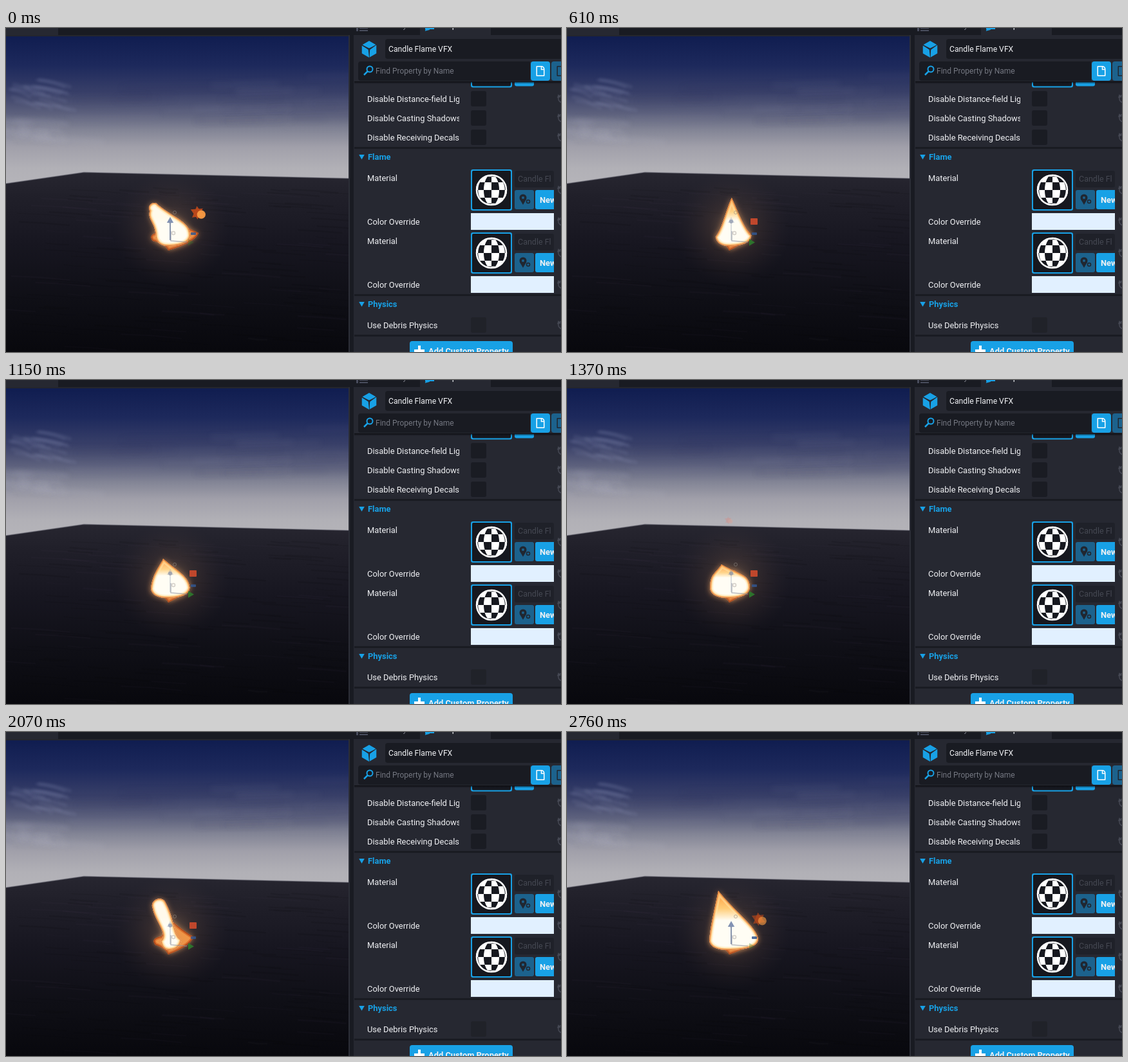
Write an HTML page with a canvas that moves like this. It is 862 px wide and 504 px high and loops after 2.83 s.

```html
<!DOCTYPE html>
<html lang="en">
<head>
<meta charset="utf-8">
<title>Candle flame editor</title>
<style>
html, body { margin: 0; width: 100%; height: 100%; overflow: hidden; background: #191b21; }
canvas { display: block; }
</style>
</head>
<body>
<canvas id="stage" width="862" height="504"></canvas>
<script>
const W = 862, H = 504, LOOP = 2830, STEP = 76.6, STEPS = 37;
const BLUE = '#18a1e6', DIM_BLUE = '#1c628d', PANEL = '#262831', DARK = '#191b22', INK = '#202630';
const stage = document.getElementById('stage').getContext('2d');
const still = document.createElement('canvas');
still.width = W;
still.height = H;
let g = still.getContext('2d');

const mix = (a, b, u) => a + (b - a) * u;
const clamp = u => Math.min(1, Math.max(0, u));

function seeded(n) {
  return () => {
    n = (n * 16807) % 2147483647;
    return n / 2147483647;
  };
}

function box(x, y, w, h, color, r = 0) {
  g.fillStyle = color;
  g.beginPath();
  g.roundRect(x, y, w, h, r);
  g.fill();
}

function poly(points, color) {
  g.fillStyle = color;
  g.beginPath();
  points.forEach(([x, y]) => g.lineTo(x, y));
  g.closePath();
  g.fill();
}

function triangle(x, y, r, angle, color) {
  poly([0, 1, 2].map(k => {
    const a = angle + k * Math.PI * 2 / 3;
    return [x + r * Math.cos(a), y + r * Math.sin(a)];
  }), color);
}

function line(points, color, width) {
  g.strokeStyle = color;
  g.lineWidth = width;
  g.beginPath();
  points.forEach(([x, y]) => g.lineTo(x, y));
  g.stroke();
}

function disc(x, y, r, color) {
  g.fillStyle = color;
  g.beginPath();
  g.arc(x, y, r, 0, 7);
  g.fill();
}

function ring(x, y, r, color, width, from = 0, to = 7) {
  g.strokeStyle = color;
  g.lineWidth = width;
  g.beginPath();
  g.arc(x, y, r, from, to);
  g.stroke();
}

function text(str, x, y, { color = '#f0f1f4', size = 12.9, weight = 400, right = W } = {}) {
  g.save();
  g.beginPath();
  g.rect(0, 0, right, H);
  g.clip();
  g.font = `${weight} ${size}px Roboto, sans-serif`;
  g.fillStyle = color;
  g.fillText(str, x, y);
  g.restore();
}

function shade(fade, stops) {
  stops.forEach(([at, color]) => fade.addColorStop(at, color));
  return fade;
}

const ramp = (y0, y1, stops) => shade(g.createLinearGradient(0, y0, 0, y1), stops);
const halo = (x, y, r, stops) => disc(x, y, r, shade(g.createRadialGradient(x, y, 0, x, y, r), stops));

// Scene behind the flame

function wisps(count, seed, area, size, color, blur) {
  const rnd = seeded(seed), [x, y, w, h] = area, [length, drop, width] = size;
  g.lineCap = 'round';
  g.filter = `blur(${blur}px)`;
  g.strokeStyle = color;
  for (let i = 0; i < count; i++) {
    const x0 = x + rnd() * w, y0 = y + rnd() * h, reach = length * (.5 + rnd());
    g.lineWidth = width * (.5 + rnd());
    g.beginPath();
    g.moveTo(x0, y0);
    g.quadraticCurveTo(x0 + reach / 2, y0 + drop * .2, x0 + reach, y0 + drop);
    g.stroke();
  }
  g.filter = 'none';
  g.lineCap = 'butt';
}

function drawSky() {
  box(0, 13, 532, 232, ramp(13, 240, [
    [0, '#101d50'], [.2, '#1d295c'], [.38, '#383f68'], [.53, '#5d617d'],
    [.64, '#828495'], [.76, '#a1a0aa'], [.9, '#b1b0b6'], [1, '#b5b4b9']
  ]));
  wisps(18, 41, [5, 80, 50, 38], [42, 11, 3], 'rgba(170,176,208,.14)', 2);
  wisps(14, 53, [-30, 140, 90, 34], [75, 6, 6], 'rgba(198,198,208,.12)', 4);
  wisps(12, 67, [100, 75, 380, 80], [120, -3, 6], 'rgba(150,155,185,.07)', 5);
  wisps(12, 71, [80, 80, 400, 85], [120, -3, 6], 'rgba(40,45,80,.06)', 5);
}

function drawGround() {
  const horizon = [[0, 242], [121, 224.5], [532, 234]];
  poly([...horizon, [532, 504], [0, 504]],
    ramp(224, 504, [[0, '#272630'], [.15, '#201f29'], [.4, '#171620'], [.7, '#0f0f16'], [1, '#08080d']]));
  line(horizon, 'rgba(100,100,112,.5)', 1.5);
  const rnd = seeded(97);
  for (let i = 0; i < 150; i++) {
    const x = rnd() * 500, y = 248 + rnd() * 250, w = 25 + rnd() * 70;
    line([[x, y], [x + w * .5, y + 2], [x + w, y + w * .07]],
      i % 3 ? 'rgba(0,0,5,.1)' : 'rgba(70,65,85,.07)', 1 + rnd() * 2);
  }
}

function drawScene() {
  g.save();
  g.beginPath();
  g.rect(0, 13, 532, 491);
  g.clip();
  drawSky();
  drawGround();
  g.restore();
  box(0, 0, 540, 12, DARK);
  box(0, 0, 81, 11, PANEL);
  box(0, 11, 533, 2, '#24262e');
  box(532, 11, 2, 493, '#2c2e37');
  box(534, 11, 6, 493, DARK);
}

// Property panel

function drawCube(x, y, r) {
  const corner = (k, size) => {
    const a = Math.PI * (k / 3 - .5);
    return [x + size * Math.cos(a), y + size * Math.sin(a)];
  };
  for (let k = 0; k < 6; k += 2) {
    poly([corner(k, 1.5), corner(k - 1, r), corner(k, r), corner(k + 1, r)], BLUE);
    line([[x, y], corner(k + 1, r + 1)], PANEL, 1.5);
  }
}

function drawPage(x, y, color, fill) {
  box(x - 6.5, y - 8, 13, 16, color, [1, 5, 1, 1]);
  box(x - 5, y - 6.5, 10, 13, fill, [0, 4, 0, 0]);
  line([[x + 1.5, y - 7], [x + 1.5, y - 2.5], [x + 6, y - 2.5]], color, 1.5);
}

function drawGlobe(x, y, r) {
  const n = 6, arc = 8, edge = k => (k / n - .5) * Math.PI;
  disc(x, y, r, '#16181f');
  for (let row = 0; row < n; row++) {
    for (let col = row % 2; col < n; col += 2) {
      const cell = [];
      for (let s = 0; s <= arc * 2 + 1; s++) {
        const back = s > arc;
        const lat = edge(row + (back ? arc * 2 + 1 - s : s) / arc);
        const lon = edge(col + back);
        cell.push([x + r * Math.sin(lon) * Math.cos(lat), y + r * Math.sin(lat)]);
      }
      poly(cell, '#fff');
    }
  }
  ring(x, y, r - 1, '#fff', 2.5);
}

function drawReset(y) {
  ring(864, y, 6, '#464954', 1.5, 1.9, 4.3);
  triangle(858.5, y - 3.5, 3.5, 2.4, '#464954');
}

function drawPin(x, y) {
  disc(x, y, 5.5, INK);
  triangle(x, y + 5, 6, Math.PI / 2, INK);
  disc(x, y, 2, DIM_BLUE);
  ring(x + 8, y + 6, 2.5, INK, 1.5);
}

function drawMaterial(y) {
  text('Material', 561, y + 18);
  box(722, y, 64, 64, BLUE, 3);
  box(724, y + 2, 60, 60, '#16181f', 2);
  drawGlobe(754, y + 32, 24);
  box(790, y + 2, 61, 26, '#1f2129', 3);
  text('Candle Fl', 795, y + 19, { color: '#454852', size: 12.5, right: 849 });
  box(790, y + 32, 30, 30, DIM_BLUE, 3);
  drawPin(803, y + 44);
  box(822, y + 32, 29, 30, BLUE, [3, 0, 0, 3]);
  text('New', 829, y + 52, { weight: 700, right: 851 });
  text('Color Override', 561, y + 86);
  box(722, y + 68, 129, 26, '#e1f0ff');
  drawReset(y + 32);
  drawReset(y + 81);
}

function drawSection(name, y) {
  box(541, y - 16, 321, 3, DARK);
  triangle(552.5, y - 1.5, 5, Math.PI / 2, BLUE);
  text(name, 562, y + 4, { color: BLUE, weight: 700 });
}

function drawToggle(name, y, fill = '#1a1c23') {
  text(name, 561, y + 5, { right: 704 });
  box(722, y - 12, 24, 24, fill, 3);
  drawReset(y);
}

function drawTabs() {
  box(540, 0, 322, 11, DARK);
  box(540, 11, 322, 493, PANEL);
  box(643, 0, 110, 12, PANEL);
  box(544, 0, 3, 5, '#484c5c');
  box(549, 0, 13, 1, '#484c5c');
  box(549, 3, 13, 2, '#484c5c');
  text('Hierarchy', 568, 0, { color: '#777a84' });
  text('Properties', 673, 0);
  box(651, 0, 14, 2, BLUE);
  triangle(654, 1.5, 4.5, Math.PI * .75, BLUE);
}

function drawSearch() {
  box(722, 62, 64, 30.5, BLUE, 3);
  box(724, 62, 60, 28.5, '#16181f', 2);
  box(790, 62, 30, 28.5, BLUE, 3);
  box(540, 48, 322, 36, PANEL);
  box(541, 83, 321, 4, ramp(83, 87, [[0, 'rgba(10,11,15,.9)'], [1, 'rgba(10,11,15,0)']]));
  box(589, 17, 273, 31, DARK, [4, 0, 0, 4]);
  text('Candle Flame VFX', 594, 37, { size: 12.2 });
  box(547, 52, 267, 30, DARK, [4, 0, 0, 4]);
  ring(565, 64, 4.5, BLUE, 2);
  line([[561.5, 67.5], [556, 73]], BLUE, 2.5);
  text('Find Property by Name', 574, 71, { color: '#747781', size: 12 });
  box(815, 52, 30, 30, BLUE, 4);
  drawPage(830, 67, '#fff', BLUE);
  box(847, 52, 15, 30, DIM_BLUE, [4, 0, 0, 4]);
  drawPage(862, 67, INK, DIM_BLUE);
}

function drawPanel() {
  drawTabs();
  drawSearch();
  drawCube(564, 33, 13);
  ['Disable Distance-field Lighting', 'Disable Casting Shadows', 'Disable Receiving Decals']
    .forEach((name, k) => drawToggle(name, 110 + k * 30));
  drawSection('Flame', 201);
  drawMaterial(220);
  drawMaterial(318);
  drawSection('Physics', 430);
  drawToggle('Use Debris Physics', 462, '#202229');
  box(541, 477, 321, 3, DARK);
  box(627, 487, 160, 30, BLUE, 4);
  box(634, 500, 16, 4, '#fff');
  box(640, 494, 4, 16, '#fff');
  text('Add Custom Property', 656, 507, { weight: 700 });
}

// Flame: a tongue leaning from a wide foot to a tip; head rounds the tip, swell fattens the sides

const poses = [
  { step: 0, tip: [230, 280], head: 8, left: 223, right: 302, swell: 1 },
  { step: 4, tip: [264, 260], head: 0, left: 233, right: 284, swell: 0 },
  { step: 11, tip: [245, 273], head: 1, left: 228, right: 290, swell: .6 },
  { step: 18, tip: [240, 288], head: 1, left: 221, right: 286, swell: 1 },
  { step: 27, tip: [238, 270], head: 11, left: 227, right: 294, swell: .2 },
  { step: 32, tip: [277, 271], head: 0, left: 222, right: 292, swell: .5 },
  { step: 36, tip: [235, 247], head: 0, left: 221, right: 297, swell: .9 }
];

function poseAt(step) {
  const last = poses.findLastIndex(p => p.step <= step);
  const a = poses[last], b = poses[(last + 1) % poses.length];
  const u = (step - a.step) / ((b.step || STEPS) - a.step), ease = u * u * (3 - 2 * u);
  const blend = key => mix(a[key], b[key], ease);
  const rnd = seeded(step * 733 + 19), sway = Math.sin(Math.PI * u) * 10;
  rnd();
  return {
    tip: a.tip.map((v, k) => mix(v, b.tip[k], ease) + (rnd() - .5) * sway),
    head: blend('head'), left: blend('left'), right: blend('right'), swell: blend('swell')
  };
}

function tongue({ tip: [x, y], head, left, right, swell }) {
  const l = left + head * 1.2, r = right - head * 2, pinch = 16 * (1 - swell), rise = 318 - 16 * swell;
  const neckX = mix(256, x, .5), neckY = mix(318, y, .5), w = 7 + swell * 12 + head * .6;
  const long = Math.hypot(x - neckX, y - neckY);
  const dx = (x - neckX) / long * head, dy = (y - neckY) / long * head;
  const path = new Path2D();
  path.moveTo(254, 339);
  path.quadraticCurveTo(l + 3, 340, l, 325);
  path.bezierCurveTo(l + pinch, rise, neckX - w, neckY, x + dy, y - dx);
  path.bezierCurveTo(x + dy + dx * 1.3, y - dx + dy * 1.3, x - dy + dx * 1.3, y + dx + dy * 1.3, x - dy, y + dx);
  path.bezierCurveTo(neckX + w, neckY, r - pinch, rise, r, 323);
  path.quadraticCurveTo(r - 2, 338, 254, 339);
  return path;
}

function skirt({ left, right }) {
  const path = new Path2D();
  path.moveTo(252, 346);
  path.quadraticCurveTo(248, 336, left + 5, 331);
  path.quadraticCurveTo(left - 3, 321, left + 14, 318);
  path.lineTo(260, 296);
  path.quadraticCurveTo(272, 307, right - 3, 319);
  path.quadraticCurveTo(right - 8, 333, 252, 346);
  return path;
}

function burn(path, fill, rims) {
  g.save();
  g.shadowColor = 'rgba(215,145,90,.7)';
  g.shadowBlur = 9;
  g.fillStyle = fill;
  g.fill(path);
  g.shadowBlur = 0;
  g.clip(path);
  rims.forEach(([width, color]) => {
    g.lineWidth = width;
    g.strokeStyle = color;
    g.stroke(path);
  });
  g.restore();
}

function drawHandles(step) {
  const seam = Math.min(step, STEPS - 1 - step), red = clamp(seam / 4);
  g.globalAlpha = .6;
  line([[256, 316], [256, 331], [281, 333]], '#8e929f', 1.5);
  ring(260, 319, 2.5, '#b9b4ae', 1.5);
  ring(262, 287, 2.5, '#8c8580', 1);
  disc(255, 301, 3, '#79829a');
  g.globalAlpha = 1 - clamp(seam / 8) * .7;
  triangle(255, 300, 6, -Math.PI / 2, '#8292b3');
  line([[255, 303], [255, 330]], '#8995ad', 2);
  g.globalAlpha = .85;
  box(287, 318, 8, 4, '#31568f', 1);
  g.globalAlpha = red * .9;
  box(285, 296, 11, 10, '#cf4a2c', 1);
  g.globalAlpha = .3 + red * .6;
  triangle(286, 333.5, 6, 0, '#2c7a2c');
  g.globalAlpha = 1;
}

// Sparks drift upwards and are brightest at their own moment
const sparks = [
  { at: 0, x: 300, y: 288, size: 11, rise: .05, outer: '#b9481b', inner: '#f99b43' },
  { at: 1370, x: 252, y: 221, size: 6, rise: .28, outer: '#c69b98', inner: '#cfa7a0' },
  { at: 2450, x: 306, y: 218, size: 9, rise: .12, outer: '#cda69d', inner: '#ffe6a6' }
];

function drawSpark(spark, time) {
  const age = (time - spark.at + LOOP * 1.5) % LOOP - LOOP / 2, life = 220;
  if (Math.abs(age) > life) return;
  const y = spark.y - age * spark.rise, r = spark.size;
  g.globalAlpha = (1 - Math.abs(age) / life) * (spark.at ? .6 : .95);
  triangle(spark.x - r * .3, y - r * .1, r, -.6, spark.outer);
  triangle(spark.x - r * .2, y, r, .4, spark.outer);
  disc(spark.x + r * .3, y + r * .2, r * .6, spark.inner);
  g.globalAlpha = 1;
}

function drawFlame(step) {
  const pose = poseAt(step), [, top] = pose.tip;
  halo(257, 312, 90, [[0, 'rgba(255,195,130,.34)'], [.4, 'rgba(190,135,95,.14)'], [1, 'rgba(90,70,70,0)']]);
  sparks.forEach(spark => drawSpark(spark, step * STEP));
  burn(skirt(pose), '#ee9547', [[7, '#dc702c'], [3, '#a8441a']]);
  const cool = 1 - clamp(pose.head / 6);
  const heat = ramp(top, mix(top, 318, .65), [
    [0, `rgb(255,${mix(250, 150, cool)},${mix(235, 55, cool)})`],
    [.6, `rgb(255,${mix(250, 205, cool)},${mix(235, 120, cool)})`],
    [1, '#fffdf4']
  ]);
  burn(tongue(pose), heat, [
    [10, 'rgba(255,232,175,.5)'], [6, 'rgba(255,185,95,.65)'], [2.5, 'rgba(220,120,55,.9)']
  ]);
  drawHandles(step);
}

function frame() {
  const time = performance.now() % LOOP;
  const step = Math.min(STEPS - 1, Math.floor((time + 10) / STEP));
  g.drawImage(still, 0, 0);
  drawFlame(step);
  requestAnimationFrame(frame);
}

drawScene();
drawPanel();
g = stage;
frame();
</script>
</body>
</html>
```
